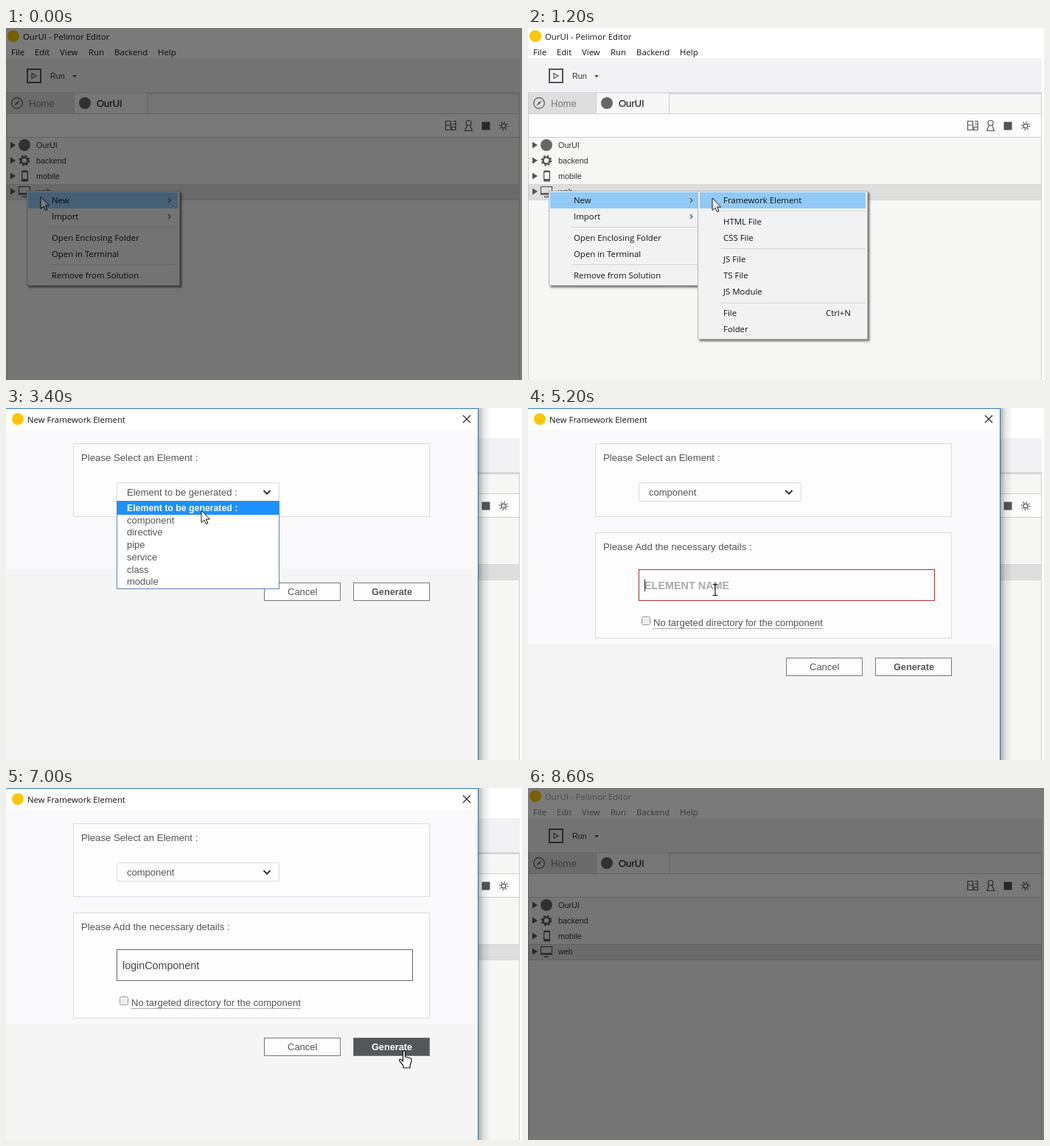
Recreate the animation shown at these times as an HTML page. Size 700 by 478 pixels, loop 8.8 s.

```html
<!DOCTYPE html>
<html lang="en">
<head>
<meta charset="utf-8">
<title>New element dialog</title>
<style>
html, body { margin: 0; width: 100%; height: 100%; overflow: hidden; background: #fff; }
svg { display: block; width: 700px; height: 478px; }
text { font: 13px "Liberation Sans", Arial, sans-serif; fill: #555; white-space: pre; }
.ui text, text.ui { font: 11.4px "Open Sans", "Noto Sans", sans-serif; fill: #111; }
.idle text { fill: #777; }
.idle .title { fill: #999; }
.tree text { font-size: 10.8px; fill: #333; }
.tab { stroke-width: .3; }
.line { fill: none; stroke: #555; stroke-width: 1.2; }
.rule { stroke: #d4d4d4; }
.box { fill: #fdfdfd; stroke: #dadada; }
.btn { fill: #fdfdfd; stroke: #777; }
.bold { font-weight: bold; font-size: 12.7px; }
.list text { font-size: 13px; }
.list .on { font-size: 12.3px; font-weight: bold; fill: #fff; }
</style>
</head>
<body>
<svg viewBox="0 0 700 478">
  <defs>
    <linearGradient id="shade">
      <stop offset="0" stop-color="#000" stop-opacity=".3"/>
      <stop offset=".4" stop-color="#000" stop-opacity=".1"/>
      <stop offset="1" stop-color="#000" stop-opacity="0"/>
    </linearGradient>
    <filter id="drop" x="-5%" y="-5%" width="112%" height="115%">
      <feDropShadow dx="2.5" dy="2.5" stdDeviation="1" flood-opacity=".5"/>
    </filter>
    <path id="fold" d="M0 -4.5 7 0 0 4.5z" fill="#555"/>
    <path id="more" class="line" d="M0 -3 3 0 0 3"/>
  </defs>

  <!-- main window -->
  <rect width="700" height="478" fill="#fff"/>
  <rect y="41" width="697" height="46" fill="#f2f2f4"/>
  <rect y="87" width="697" height="30" fill="#f6f6f5"/>
  <rect y="87" width="697" height="3" fill="#d5d9d9"/>
  <rect y="88" width="93" height="28" fill="#dedede"/>
  <rect x="93" y="88.5" width="98" height="28" fill="#f6f7f6"/>
  <path d="M92.5 88V116M191.5 88V116M0 116.5H697" stroke="#cfcfcf"/>
  <rect y="117" width="697" height="31" fill="#fdfdfd"/>
  <rect y="149" width="697" height="329" fill="#f6f6f5"/>
  <path d="M0 148.5H697M.5 88V478M696.5 88V478" stroke="#cdcdcf"/>
  <rect id="row" x="1.5" y="212.5" width="695" height="21"/>

  <circle cx="10" cy="11" r="8" fill="#fdc60b"/>
  <g class="ui" id="head">
    <text class="title" x="23" y="16">OurUI - Pelimor Editor</text>
    <text x="7" y="37">File</text><text x="39" y="37">Edit</text>
    <text x="73" y="37">View</text><text x="112" y="37">Run</text>
    <text x="147" y="37">Backend</text><text x="206" y="37">Help</text>
  </g>

  <rect class="line" x="29" y="56" width="18" height="18" style="stroke-width:2"/>
  <path class="line" d="M35 61.5 41 65 35 68.5z"/>
  <path d="M90 64h6l-3 3.5z" fill="#555"/>
  <g class="tree">
    <text x="60" y="69">Run</text>
    <text x="41" y="163">OurUI</text>
    <text x="41" y="184">backend</text>
    <text x="41" y="205">mobile</text>
    <text x="41" y="226">web</text>
  </g>
  <text class="tab" x="31" y="107" style="fill:#888;stroke:#888">Home</text>
  <text class="tab" x="123" y="107" style="fill:#333;stroke:#333">OurUI</text>
  <circle class="line" cx="15" cy="102" r="7.3"/>
  <path d="M18.5 98.5 16 103 11.5 105.5 14 101z" fill="#666"/>
  <g fill="#666"><circle cx="107" cy="102" r="8"/><circle cx="25" cy="159" r="8"/></g>
  <use href="#fold" x="6" y="159"/><use href="#fold" x="6" y="180"/>
  <use href="#fold" x="6" y="201"/><use href="#fold" x="6" y="222"/>
  <circle cx="25" cy="180" r="4.5" fill="none" stroke="#555" stroke-width="2.6"/>
  <circle cx="25" cy="180" r="6.4" fill="none" stroke="#555" stroke-width="2" stroke-dasharray="2.5 2.53"/>
  <rect x="21" y="193.5" width="9" height="15" rx="1.5" fill="#555"/>
  <rect x="22.3" y="196" width="6.4" height="9" fill="#f6f6f5"/>
  <rect class="line" x="17.5" y="215.5" width="15" height="10" fill="#eee"/>
  <path d="M17 224h16v2.5H17zM22 228.5h6v1.5h-6z" fill="#555"/>

  <path class="line" d="M596.5 126.500h7v5.500h-7zM596.500 132h7v6.500h-7zM606 126.500h4v4h-4M610 130.500v4M605 134.500h5v4h-5z"/>
  <circle class="line" cx="627.500" cy="129" r="3.500"/>
  <path class="line" d="M625.500 132 622.500 139.500H632.500L629.500 132"/>
  <rect x="645.500" y="127.500" width="11" height="11" fill="#555"/>
  <circle class="line" cx="675" cy="133" r="2.800"/>
  <circle cx="675" cy="133" r="5" fill="none" stroke="#666" stroke-width="2.500" stroke-dasharray="1.200 2.727"/>

  <!-- context menus -->
  <g id="menu" class="ui">
    <rect x="28.500" y="221.500" width="207" height="128" fill="#f2f2f3" stroke="#b5b5b5" filter="url(#drop)"/>
    <rect x="30" y="223" width="203" height="22" fill="#91c9f7"/>
    <path class="rule" d="M58 270.500H230M58 321.500H230"/>
    <text x="62" y="238">New</text><text x="62" y="260">Import</text>
    <text x="62" y="289">Open Enclosing Folder</text>
    <text x="62" y="311">Open in Terminal</text>
    <text x="62" y="340">Remove from Solution</text>
    <use href="#more" x="220" y="234"/><use href="#more" x="220" y="256"/>
  </g>
  <g id="sub" class="ui">
    <rect x="230.500" y="221.500" width="230" height="201" fill="#f2f2f3" stroke="#b5b5b5" filter="url(#drop)"/>
    <rect id="subHover" x="233" y="223" width="225" height="22" fill="#91c9f7"/>
    <path class="rule" d="M261 248.500H458M261 299.500H458M261 373.500H458"/>
    <text x="265" y="238">Framework Element</text>
    <text x="265" y="267">HTML File</text><text x="265" y="289">CSS File</text>
    <text x="265" y="318">JS File</text><text x="265" y="340">TS File</text>
    <text x="265" y="362">JS Module</text>
    <text x="265" y="391">File</text><text x="404" y="391">Ctrl+N</text>
    <text x="265" y="413">Folder</text>
  </g>

  <!-- dialog -->
  <g id="dialog">
    <rect x="641" width="16" height="478" fill="url(#shade)"/>
    <rect width="640" height="478" fill="#f5f5f5"/>
    <rect id="form" width="640" fill="#fafafc"/>
    <rect width="640" height="30" fill="#fff"/>
    <path d="M0 .5H640.500V478" fill="none" stroke="#2c78b8"/>
    <circle cx="16" cy="15" r="8" fill="#fdc60b"/>
    <text class="ui" x="29" y="20">New Framework Element</text>
    <path d="M620 10 630 20M630 10 620 20" stroke="#222" stroke-width="1.200"/>
    <rect class="box" x="91.500" y="48.500" width="483" height="99"/>
    <text x="102" y="72" style="font-size:13.200px">Please Select an Element :</text>
    <rect class="box" x="150.500" y="101.500" width="220" height="25" rx="1"/>
    <text id="choice" x="164" y="119"></text>
    <path d="M349.500 112 354 116.500 358.500 112" fill="none" stroke="#333" stroke-width="2"/>

    <g id="details">
      <rect class="box" x="91.500" y="169.500" width="483" height="143"/>
      <text x="102" y="193" style="font-size:13.200px">Please Add the necessary details :</text>
      <rect id="input" x="150.500" y="219.500" width="401" height="42" fill="#fdfdfd"/>
      <text id="hint" x="158" y="246" style="font-size:14.400px;font-weight:bold;fill:#aaa">ELEMENT NAME</text>
      <text id="typed" x="158" y="246" style="font-size:14.300px;fill:#444"></text>
      <rect id="caret" y="233" width="1" height="16" fill="#222"/>
      <rect x="154.500" y="283.500" width="11" height="11" rx="2" fill="#eee" stroke="#999"/>
      <text x="170" y="296">No targeted directory for the component</text>
      <path d="M170 299.500H400" stroke="#555" stroke-dasharray="1 1"/>
    </g>

    <g id="buttons">
      <rect class="btn" x="350.500" y="237.500" width="103" height="24"/>
      <rect class="btn" id="go" x="471.500" y="237.500" width="103" height="24"/>
      <text x="382" y="254">Cancel</text>
      <text class="bold" id="goText" x="496" y="254">Generate</text>
    </g>

    <g id="list" class="list">
      <rect x="150.500" y="126.500" width="220" height="119" fill="#fff" stroke="#5b86b5"/>
      <rect id="pick" x="151" width="219" height="18" fill="#1e90ff"/>
    </g>
  </g>

  <!-- pointers -->
  <path id="arrow" d="M0 0V16.500L4 13 6.500 18.500 9 17.500 6.500 12H11.500z" fill="#fff" stroke="#111"/>
  <path id="beam" d="M-3.500 -7.500H-1Q0 -7.500 0 -6.500Q0 -7.500 1 -7.500H3.500M0 -6.500V6.500M-3.500 7.500H-1Q0 7.500 0 6.500Q0 7.500 1 7.500H3.500" fill="none" stroke="#111" stroke-width="1.200"/>
  <path id="hand" d="M-1.500 1Q0 -1 1.500 1V8L4 8.500 9 10Q10.500 11 10 14L8 20V23H-1V20L-6 14Q-7 11 -4.500 11.500L-1.500 14z" fill="#fff" stroke="#111" stroke-width="1.200"/>

  <rect id="dim" width="700" height="478" opacity=".52"/>
</svg>

<script>
const LOOP = 8800, STEP = 200;
const NAME = "loginComponent";
const OPTIONS = ["Element to be generated :", "component", "directive", "pipe", "service", "class", "module"];
// time, x, y
const PATH = [
  [0, 47, 229], [400, 47, 229], [1200, 250, 231], [1600, 250, 231],
  [2800, 265, 115], [3200, 265, 115], [3400, 265, 139], [3800, 250, 150],
  [4200, 250, 150], [4800, 254, 247], [6600, 254, 247], [7000, 540, 357], [7400, 540, 357]
];

const $ = id => document.getElementById(id);
const show = (id, on) => $(id).style.display = on ? "" : "none";
const set = (id, attrs) => { for (const k in attrs) $(id).setAttribute(k, attrs[k]); };
const within = (t, a, b) => t >= a && t < b;

const items = OPTIONS.map((label, i) => {
  const el = document.createElementNS("http://www.w3.org/2000/svg", "text");
  el.textContent = label;
  el.setAttribute("x", 164);
  el.setAttribute("y", 140 + i * 16.7);
  $("list").append(el);
  return el;
});

function pointerAt(t) {
  const i = PATH.findIndex(p => p[0] > t);
  if (i < 0) return PATH[PATH.length - 1].slice(1);
  const [t0, x0, y0] = PATH[i - 1], [t1, x1, y1] = PATH[i];
  const k = (t - t0) / (t1 - t0);
  return [x0 + (x1 - x0) * k, y0 + (y1 - y0) * k];
}

function drawMain(t) {
  const idle = t >= 7400;
  $("head").classList.toggle("idle", idle);
  set("row", idle ? { fill: "#e1e1e3", stroke: "#c6c6c8" } : { fill: "#dedede", stroke: "#d6d6d6" });
  show("menu", t < 1400);
  show("sub", within(t, 400, 1400));
  show("subHover", t >= 1000);
  show("dim", t < 200 || t >= 8600);
}

function drawDialog(t) {
  const chosen = t >= 4200, hot = t >= 7000;
  show("dialog", within(t, 1600, 7400));
  show("details", chosen);
  show("list", within(t, 3200, 4200));
  set("form", { height: chosen ? 320 : 218 });
  set("buttons", { transform: `translate(0 ${chosen ? 102 : 0})` });
  $("choice").textContent = OPTIONS[chosen ? 1 : 0];

  const hover = t >= 3600 ? 1 : 0;
  set("pick", { y: 127 + hover * 17 });
  items.forEach((el, i) => el.setAttribute("class", i === hover ? "on" : ""));

  const count = Math.round(NAME.length * Math.min(1, Math.max(0, (t - 5400) / 1200)));
  $("typed").textContent = NAME.slice(0, count);
  show("hint", !count);
  set("input", { stroke: count ? "#666" : "#b03030" });
  show("caret", within(t, 5200, 6800));
  set("caret", { x: 158 + (count ? $("typed").getComputedTextLength() : 0) });

  $("go").style.fill = hot ? "#53575a" : "";
  $("goText").style.fill = hot ? "#fff" : "";
}

function drawPointer(t) {
  const [x, y] = pointerAt(t);
  const kind = within(t, 4600, 6800) ? "beam" : t >= 7000 ? "hand" : "arrow";
  for (const id of ["arrow", "beam", "hand"]) {
    show(id, id === kind && t < 7400);
    set(id, { transform: `translate(${Math.round(x)} ${Math.round(y)})` });
  }
}

function frame() {
  const t = Math.floor(performance.now() % LOOP / STEP) * STEP;
  drawMain(t);
  drawDialog(t);
  drawPointer(t);
  requestAnimationFrame(frame);
}
frame();
</script>
</body>
</html>
```
